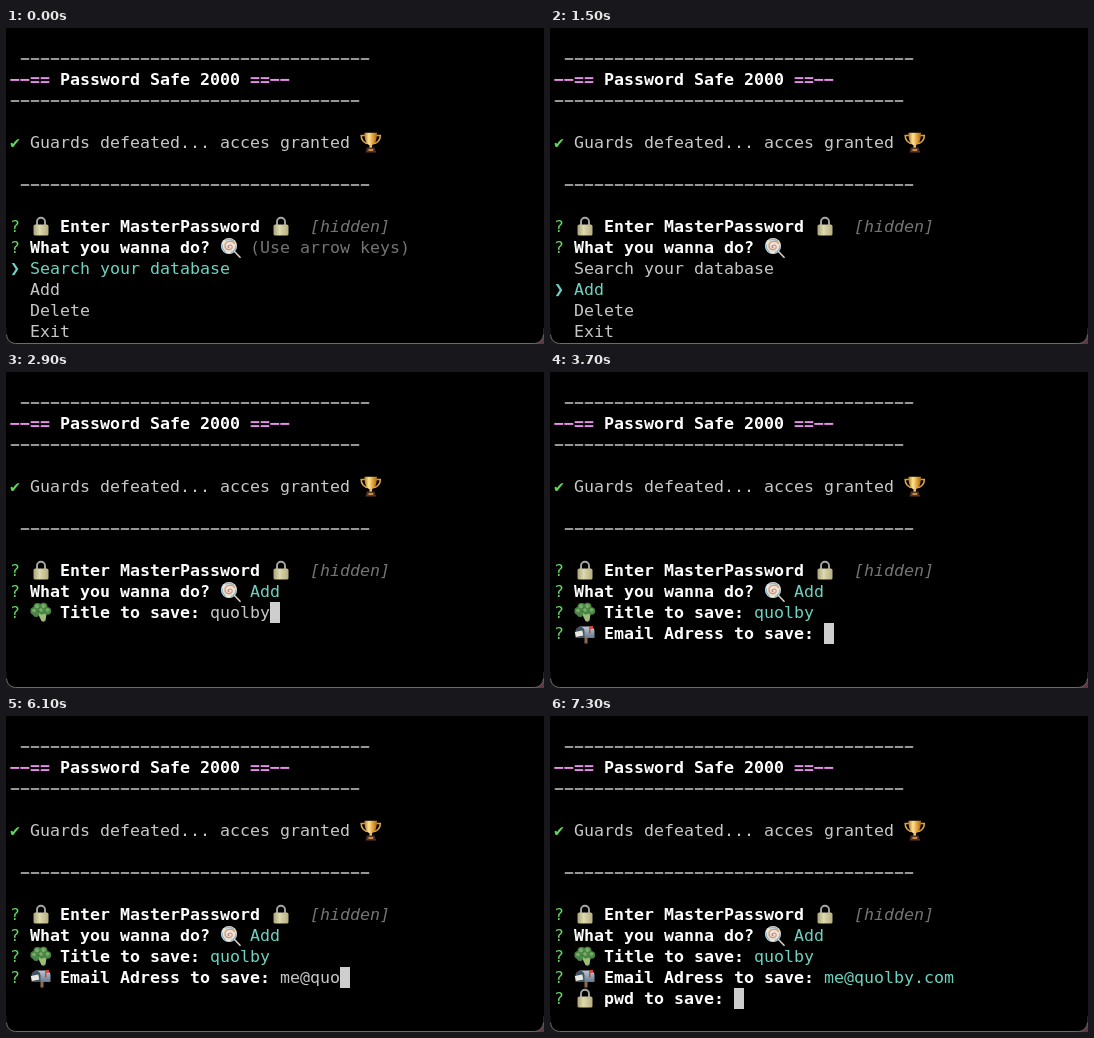
These frames come from a looping animation (538x316 px, 8 s). An HTML page:

```html
<!DOCTYPE html>
<html lang="en">
<head>
<meta charset="utf-8">
<title>Password Safe</title>
<style>
  html, body { margin: 0; width: 100%; height: 100%; overflow: hidden; background: #000; }
  svg { display: block; width: 538px; height: 316px; }
  text { font: 16.61px "DejaVu Sans Mono", monospace; white-space: pre; fill: #c7c7c7; }
  .bold { font-weight: bold; fill: #fff; }
  .pink { font-weight: bold; fill: #ec8eee; }
  .green { fill: #63d45f; }
  .cyan { fill: #6dd2c0; }
  .dim { fill: #747474; }
  .hidden { fill: #747474; font-style: italic; }
</style>
</head>
<body>
<svg id="stage" viewBox="0 0 538 316" xmlns="http://www.w3.org/2000/svg">
  <defs>
    <linearGradient id="gold" x2="1">
      <stop offset="0" stop-color="#aaa477"/>
      <stop offset=".4" stop-color="#ddd8ae"/>
      <stop offset="1" stop-color="#b5ae80"/>
    </linearGradient>
    <linearGradient id="cup" x2="1">
      <stop offset="0" stop-color="#b97a22"/>
      <stop offset=".35" stop-color="#ffe391"/>
      <stop offset=".7" stop-color="#dd9c36"/>
      <stop offset="1" stop-color="#a9681a"/>
    </linearGradient>
    <linearGradient id="steel" x2="0" y2="1">
      <stop offset="0" stop-color="#bccbd6"/>
      <stop offset="1" stop-color="#647b8d"/>
    </linearGradient>
    <g id="lock">
      <path d="M7 10V5.800a4 4 0 0 1 8 0V10" fill="none" stroke="#a4a8a2" stroke-width="1.900"/>
      <rect x="3.500" y="8.500" width="15" height="11" rx="1.600" fill="url(#gold)"/>
    </g>
    <g id="trophy">
      <path d="M5.500 3.500H1.200C1 7.500 4 11.500 8.500 11.500M16 3.500h4.300C20.500 7.500 17.500 11.500 13 11.500" fill="none" stroke="#d9a044" stroke-width="1.600"/>
      <path d="M4.500 .8h12.500C17 7.500 15.500 12 12 13.300V16H9.500V13.300C6 12 4.500 7.500 4.500 .8Z" fill="url(#cup)"/>
      <path d="M7 15.500h7.500l1.500 5H5.500Z" fill="#5b3524"/>
      <path d="M8.500 18h4.500" stroke="#e0b255" stroke-width="1.500"/>
    </g>
    <g id="lolly">
      <path d="M14 14L20 20.300" stroke="#d9cdbd" stroke-width="1.600" stroke-linecap="round"/>
      <circle cx="9" cy="9" r="8" fill="#e9e7dd"/>
      <circle cx="9" cy="9" r="6.800" fill="none" stroke="#8fbccb" stroke-width="1.500" stroke-dasharray="9 5"/>
      <path d="M9 9c1-2 4-.5 3 2-1.500 3-7 2-7-2 0-5 7-6.500 10-2" fill="none" stroke="#d99a70" stroke-width="1.400"/>
      <path d="M9 8.500c-1.500.5-1 2.500.5 2.200" fill="none" stroke="#cc7186" stroke-width="1.300"/>
    </g>
    <g id="broccoli">
      <path d="M7 10L11.500 19Q14 20.500 15.500 18.500L17 9Z" fill="#9cbd76"/>
      <g fill="#4a8646">
        <circle cx="4.300" cy="9" r="3.900"/><circle cx="7.500" cy="5" r="4"/>
        <circle cx="13.500" cy="4.700" r="4"/><circle cx="17.500" cy="9" r="3.700"/>
        <circle cx="6" cy="12" r="3"/><circle cx="12" cy="9" r="3.500"/>
      </g>
      <g fill="#7aae66">
        <circle cx="7" cy="4.300" r="2"/><circle cx="13.500" cy="4" r="2"/>
        <circle cx="4" cy="8.500" r="1.800"/><circle cx="11" cy="8" r="1.800"/><circle cx="17.500" cy="8" r="1.800"/>
      </g>
    </g>
    <g id="mailbox">
      <path d="M10.500 14h3v6.500h-3Z" fill="#8b6a50"/>
      <path d="M5.500 3.500H16a4.500 4.500 0 0 1 4.500 4.500v7H5.500Z" fill="url(#steel)"/>
      <path d="M1.500 15V8.200a4.500 4.500 0 0 1 9 0V15Z" fill="#42525f"/>
      <path d="M.8 9l7.500-1.500 1 5L1.800 14Z" fill="#e8e8e2"/>
      <path d="M15 10.500V3h4v2.800h-2.500v4.700Z" fill="#cf463d"/>
    </g>
  </defs>
  <path d="M0 300H269V316H0Z" fill="#1d1a1c"/>
  <path d="M269 300H538V316H269Z" fill="#6b3341"/>
  <rect x=".5" y="-20" width="537" height="335.500" rx="9" fill="#000"/>
  <path d="M.5 306.500a9 9 0 0 0 9 9H528.500a9 9 0 0 0 9-9" fill="none" stroke="#6a6a6a"/>
</svg>
<script>
const LOOP = 8000, LEFT = 4, TOP = 20, COL = 10, ROW = 21;
const stage = document.getElementById('stage');
const timed = [];

const colX = c => LEFT + c * COL;
const rowY = r => TOP + r * ROW;

function add(tag, attrs, from = 0, to = LOOP) {
  const el = document.createElementNS('http://www.w3.org/2000/svg', tag);
  for (const k in attrs) el.setAttribute(k, attrs[k]);
  stage.append(el);
  if (from > 0 || to < LOOP) timed.push({ el, from, to });
  return el;
}

function text(row, col, str, cls = '', from, to) {
  const el = add('text', { x: colX(col), y: rowY(row) + 16, class: cls }, from, to);
  el.textContent = str;
  return el;
}

function icon(row, col, name, from, to) {
  add('use', { href: '#' + name, transform: `translate(${colX(col)} ${rowY(row)})` }, from, to);
}

function rule(row, col) {
  add('path', {
    d: `M${colX(col) + 0.8} ${rowY(row) + 11}h349`,
    stroke: '#c7c7c7', 'stroke-width': 1.5, 'stroke-dasharray': '8.4 1.6'
  });
}

// Header
rule(0, 1);
text(1, 0, '−−==', 'pink');
text(1, 5, 'Password Safe 2000', 'bold');
text(1, 24, '==−−', 'pink');
rule(2, 0);
text(4, 0, '✔', 'green');
text(4, 2, 'Guards defeated... acces granted');
icon(4, 35, 'trophy');
rule(6, 1);

function question(row, col, label, name, iconCol, from) {
  text(row, 0, '?', 'green', from);
  icon(row, iconCol, name, from);
  text(row, col, label, 'bold', from);
}

question(8, 5, 'Enter MasterPassword', 'lock', 2);
icon(8, 26, 'lock');
text(8, 30, '[hidden]', 'hidden');
question(9, 2, 'What you wanna do?', 'lolly', 21);

// Menu: [time, selected line]
const CHOSEN = 2200;
const moves = [[0, 0], [100, 1], [500, 2], [900, 1]];
text(9, 24, '(Use arrow keys)', 'dim', 0, moves[1][0]);
text(9, 24, 'Add', 'cyan', CHOSEN);
const pointer = text(10, 0, '❯', 'cyan', 0, CHOSEN);
const options = ['Search your database', 'Add', 'Delete', 'Exit']
  .map((label, i) => text(10 + i, 2, label, '', 0, CHOSEN));

// Prompts: keys holds the time at which each letter appears
const prompts = [
  { row: 10, label: 'Title to save:', name: 'broccoli', value: 'quolby',
    from: CHOSEN, to: 3200, keys: [2300, 2400, 2500, 2600, 2700, 2900] },
  { row: 11, label: 'Email Adress to save:', name: 'mailbox', value: 'me@quolby.com',
    from: 3200, to: 7200,
    keys: [4900, 4900, 5500, 5700, 5900, 6100, 6300, 6400, 6500, 6500, 6700, 6800, 6900] },
  { row: 12, label: 'pwd to save:', name: 'lock', value: '', from: 7200, to: LOOP, keys: [] }
];
for (const p of prompts) {
  question(p.row, 5, p.label, p.name, 2, p.from);
  p.col = 6 + p.label.length;
  p.input = text(p.row, p.col, '', '', p.from);
}
const cursor = add('rect', { width: COL, height: ROW, fill: '#cecece' }, CHOSEN);

function draw(t) {
  for (const { el, from, to } of timed)
    el.setAttribute('visibility', t >= from && t < to ? 'visible' : 'hidden');

  const selected = moves.filter(m => m[0] <= t).pop()[1];
  pointer.setAttribute('y', rowY(10 + selected) + 16);
  options.forEach((el, i) => el.setAttribute('class', i === selected ? 'cyan' : ''));

  for (const p of prompts) {
    const n = p.keys.filter(k => k <= t).length;
    p.input.textContent = p.value.slice(0, n);
    p.input.setAttribute('class', t >= p.to ? 'cyan' : '');
    if (t >= p.from && t < p.to) {
      cursor.setAttribute('x', colX(p.col + n));
      cursor.setAttribute('y', rowY(p.row));
    }
  }
}

const start = performance.now();
function tick() {
  draw((performance.now() - start) % LOOP);
  requestAnimationFrame(tick);
}
tick();
</script>
</body>
</html>
```
